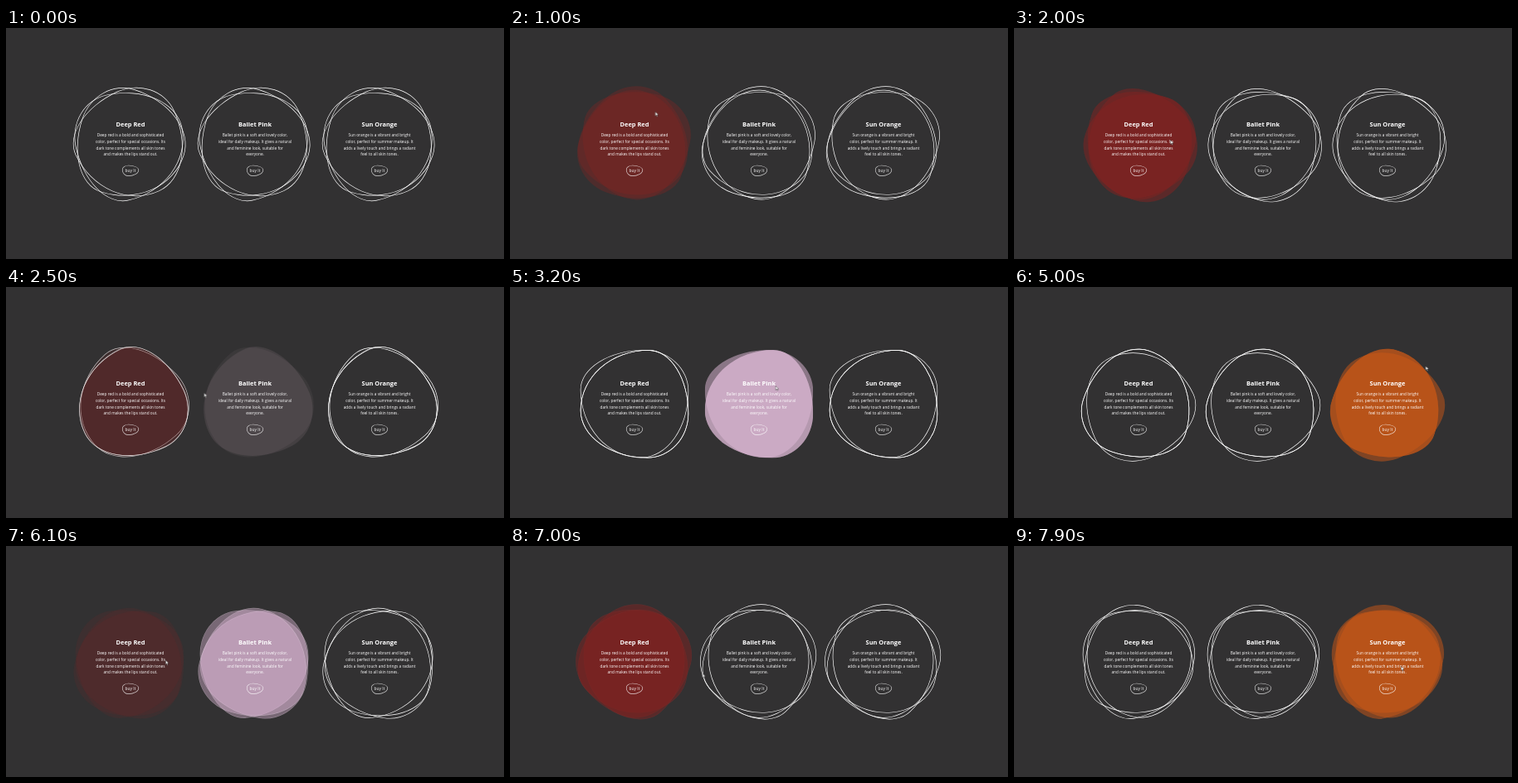
Write an HTML page that moves like this. It is 600 px wide and 279 px high and loops after 8000 ms.

```html
<!DOCTYPE html>
<html lang="en">
<head>
<meta charset="utf-8">
<title>Blob cards</title>
<style>
  /* A registered angle keeps the rotation painted with crisp edges. */
  @property --angle { syntax: "<angle>"; inherits: false; initial-value: 0deg; }

  html, body { margin: 0; width: 100%; height: 100%; overflow: hidden; background: #323132; }
  .stage {
    position: absolute; width: 1840px; height: 856px;
    transform: scale(.32609); transform-origin: 0 0;
    color: #fff; font-family: "Open Sans", "Noto Sans", sans-serif; text-align: center;
  }
  .card { position: absolute; top: 233px; width: 400px; height: 400px; }
  .card i, .buy { box-sizing: border-box; border: 2px solid #fff; border-radius: 38% 62% 63% 37% / 41% 44% 56% 59%; }
  .card i {
    position: absolute; inset: 0;
    transform: rotate(var(--angle));
    animation: spin 8s linear infinite, var(--hover) 8s ease infinite;
  }
  .card i:nth-child(1) { --from: 348deg; --turn: 480deg; }
  .card i:nth-child(2) { --from: 18deg; --turn: -720deg; }
  .card i:nth-child(3) { --from: 65deg; --turn: 288deg; }
  .red { left: 260px; --hover: red; --fill: rgb(131 35 33 / .5); }
  .pink { left: 720px; --hover: pink; --fill: rgb(225 187 218 / .5); }
  .orange { left: 1180px; --hover: orange; --fill: rgb(203 88 22 / .5); }

  h2, p, .buy { position: absolute; margin: 0; white-space: nowrap; }
  h2 { top: 108px; width: 100%; font: 700 22.8px/32px "Open Sans", "Noto Sans", sans-serif; }
  p { top: 153px; width: 100%; font-size: 14.6px; line-height: 23.4px; }
  .buy { left: 169px; top: 275px; width: 62px; height: 41px; font-size: 15px; line-height: 37px; border-color: #fffc; }
  .cursor { position: absolute; left: 0; top: 0; width: 5px; height: 7px; animation: move 8s linear infinite; }

  @keyframes spin {
    from { --angle: var(--from); }
    to { --angle: calc(var(--from) + var(--turn)); }
  }
  @keyframes red {
    0%, 10% { background: transparent; border-color: #fff; }
    10.01% { background: transparent; border-color: transparent; }
    16.25%, 28.75% { background: var(--fill); border-color: transparent; }
    35%, 75.1% { background: transparent; border-color: #fff; }
    75.11% { background: transparent; border-color: transparent; }
    81.35%, 87.3% { background: var(--fill); border-color: transparent; }
    93.55%, 100% { background: transparent; border-color: #fff; }
  }
  @keyframes pink {
    0%, 30.6% { background: transparent; border-color: #fff; }
    30.61% { background: transparent; border-color: transparent; }
    36.85%, 50.6% { background: var(--fill); border-color: transparent; }
    56.85%, 66.9% { background: transparent; border-color: #fff; }
    66.91% { background: transparent; border-color: transparent; }
    73.1%, 75.3% { background: var(--fill); border-color: transparent; }
    81.55%, 100% { background: transparent; border-color: #fff; }
  }
  @keyframes orange {
    0%, 52.5% { background: transparent; border-color: #fff; }
    52.51% { background: transparent; border-color: transparent; }
    58.75%, 65.6% { background: var(--fill); border-color: transparent; }
    71.85%, 92% { background: transparent; border-color: #fff; }
    92.01% { background: transparent; border-color: transparent; }
    98.2%, 100% { background: var(--fill); border-color: transparent; }
  }
  @keyframes move {
    0%, 4% { transform: translate(160px, -10px); }
    10% { transform: translate(165px, 76px); }
    16%, 25% { transform: translate(188px, 135px); }
    28.75% { transform: translate(215px, 130px); }
    40% { transform: translate(319.5px, 119px); }
    50.6% { transform: translate(365px, 115px); }
    62.5% { transform: translate(496px, 95px); }
    65.6% { transform: translate(384px, 110px); }
    75% { transform: translate(215px, 136px); }
    76.25% { transform: translate(192px, 137.5px); }
    81% { transform: translate(175px, 146px); }
    87.5% { transform: translate(231px, 153.5px); }
    92% { transform: translate(385px, 149px); }
    98.75%, 100% { transform: translate(466px, 145px); }
  }
</style>
</head>
<body>
<div class="stage">
  <div class="card red"><i></i><i></i><i></i>
    <h2>Deep Red</h2>
    <p>Deep red is a bold and sophisticated<br>color, perfect for special occasions. Its<br>dark tone complements all skin tones<br>and makes the lips stand out.</p>
    <div class="buy">buy It</div>
  </div>
  <div class="card pink"><i></i><i></i><i></i>
    <h2>Ballet Pink</h2>
    <p>Ballet pink is a soft and lovely color,<br>ideal for daily makeup. It gives a natural<br>and feminine look, suitable for<br>everyone.</p>
    <div class="buy">buy It</div>
  </div>
  <div class="card orange"><i></i><i></i><i></i>
    <h2>Sun Orange</h2>
    <p>Sun orange is a vibrant and bright<br>color, perfect for summer makeup. It<br>adds a lively touch and brings a radiant<br>feel to all skin tones.</p>
    <div class="buy">buy It</div>
  </div>
</div>
<svg class="cursor" viewBox="0 0 5 7"><path d="M.4 .4V5.4L1.6 4.3L2.4 6.2L3.2 5.9L2.4 4.1H4Z" fill="#fff" stroke="#222" stroke-width=".4"/></svg>
</body>
</html>
```
